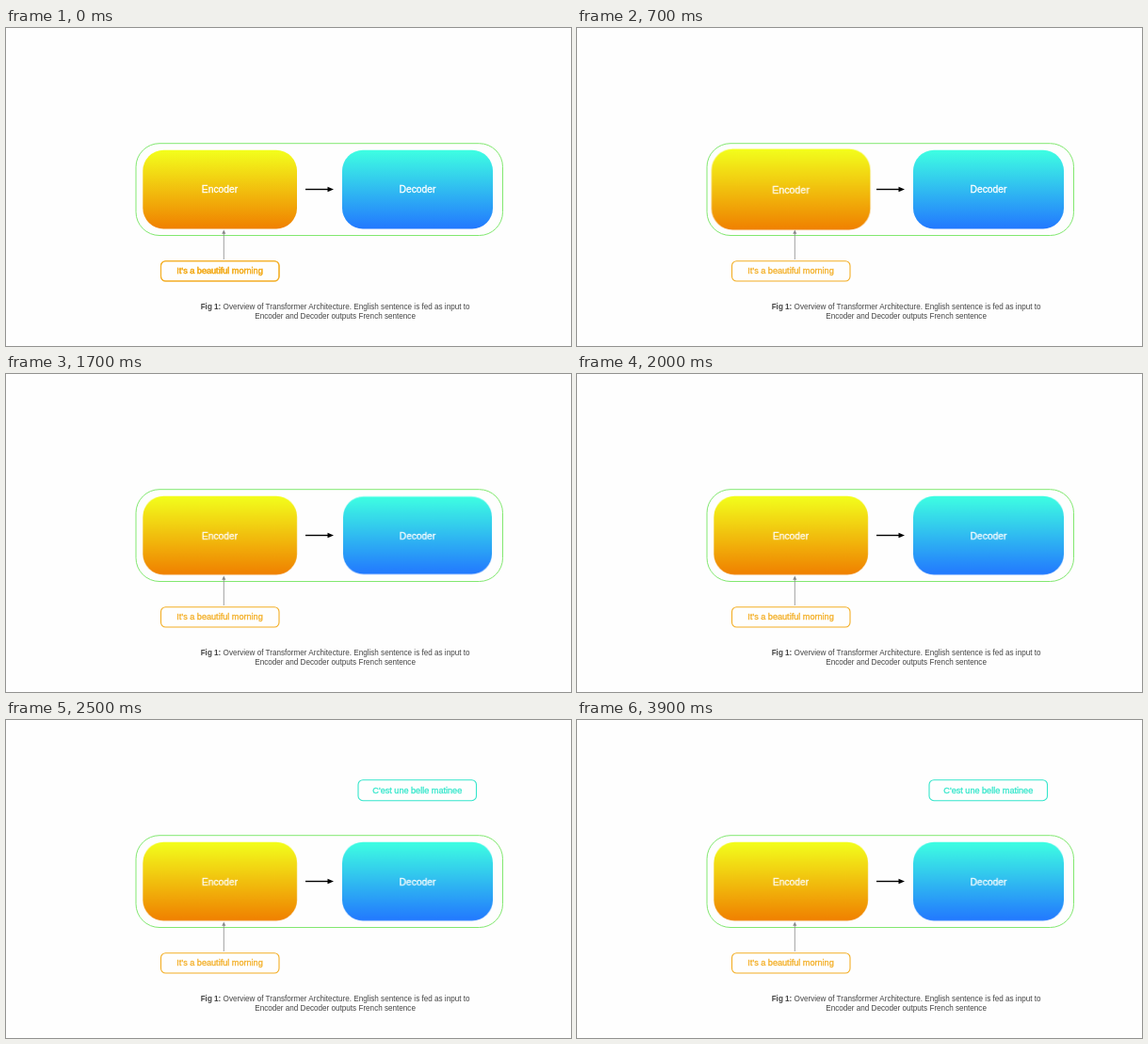
An HTML page for the animation above (4000 ms loop, 600 px wide and 338 px high).

```html
<!DOCTYPE html>
<html lang="en">
<head>
<meta charset="utf-8">
<title>Transformer overview</title>
<style>
  html, body { margin: 0; width: 100%; height: 100%; overflow: hidden; background: #fefefe; }
  svg { display: block; width: 600px; height: 338px; }
  text { font-family: "Liberation Sans", Arial, sans-serif; text-anchor: middle; }

  .label { font-size: 10.3px; fill: #fff; stroke: #fff; stroke-width: .3px; }
  .phrase rect { fill: none; stroke: currentColor; stroke-width: 1.1px; }
  .phrase text { font-size: 9.12px; fill: currentColor; stroke: currentColor; stroke-width: .3px; }
  .english { color: #f3ae24; }
  .french { color: #35e6cb; }
  .caption { font-size: 8.13px; fill: #444; }

  .feed, .emit, .block { animation: 4s linear infinite; }
  .feed { animation-name: feed; }
  .emit { animation-name: emit; }
  .block { transform-box: fill-box; transform-origin: center; }
  .encoder { animation-name: pop-encoder; }
  .decoder { animation-name: pop-decoder; }

  @keyframes feed {
    0% { transform: none; animation-timing-function: cubic-bezier(.37, 0, .63, 1); }
    14.75%, 100% { transform: translateY(-87px); }
  }
  @keyframes emit {
    0%, 46.25% { transform: translateY(97px); animation-timing-function: cubic-bezier(.37, 0, .63, 1); }
    61%, 100% { transform: none; }
  }
  @keyframes pop-encoder {
    0%, 15% { transform: scale(1); animation-timing-function: ease-in-out; }
    19.5% { transform: scale(1.05); animation-timing-function: ease-in; }
    25% { transform: scale(1); animation-timing-function: ease-out; }
    27.5% { transform: scale(.988); animation-timing-function: ease-in-out; }
    30%, 100% { transform: scale(1); }
  }
  @keyframes pop-decoder {
    0%, 30% { transform: scale(1); animation-timing-function: ease-in-out; }
    34.5% { transform: scale(1.05); animation-timing-function: ease-in; }
    40% { transform: scale(1); animation-timing-function: ease-out; }
    42.5% { transform: scale(.988); animation-timing-function: ease-in-out; }
    45%, 100% { transform: scale(1); }
  }
</style>
</head>
<body>
<svg viewBox="0 0 600 338">
  <defs>
    <linearGradient id="warm" x2="0" y2="1">
      <stop stop-color="#f3ff1c"/>
      <stop offset="1" stop-color="#f08000"/>
    </linearGradient>
    <linearGradient id="cool" x2="0" y2="1">
      <stop stop-color="#3effe2"/>
      <stop offset="1" stop-color="#2278ff"/>
    </linearGradient>
    <g id="english" class="phrase english">
      <rect x="164.5" y="247.7" width="125.5" height="21.3" rx="5"/>
      <text x="227" y="261.4">It’s a beautiful morning</text>
    </g>
  </defs>

  <rect x="138" y="122.7" width="389.5" height="97.8" rx="25" fill="none" stroke="#82e870"/>

  <use href="#english"/>
  <g class="feed"><use href="#english"/></g>
  <g class="emit phrase french">
    <rect x="374" y="63.7" width="125.5" height="22" rx="5"/>
    <text x="436.8" y="77.6">C'est une belle matinee</text>
  </g>

  <g class="block encoder">
    <rect x="145.3" y="129.8" width="163.7" height="83.6" rx="22" fill="url(#warm)"/>
    <text class="label" x="227" y="175.4">Encoder</text>
  </g>
  <g class="block decoder">
    <rect x="357" y="129.8" width="160" height="83.6" rx="22" fill="url(#cool)"/>
    <text class="label" x="437" y="175.4">Decoder</text>
  </g>

  <path d="M318 171.5H342" stroke="#000" stroke-width="1.4"/>
  <path d="M341.5 168.7L348 171.5L341.5 174.3Z"/>
  <path d="M231.3 246V218" stroke="#888" stroke-width=".8"/>
  <path d="M229.3 218.8L231.3 214.6L233.3 218.8Z" fill="#888"/>

  <text class="caption" x="349.6" y="299"><tspan font-weight="bold">Fig 1:</tspan> Overview of Transformer Architecture. English sentence is fed as input to</text>
  <text class="caption" x="349.6" y="309.4">Encoder and Decoder outputs French sentence</text>
</svg>
</body>
</html>
```
